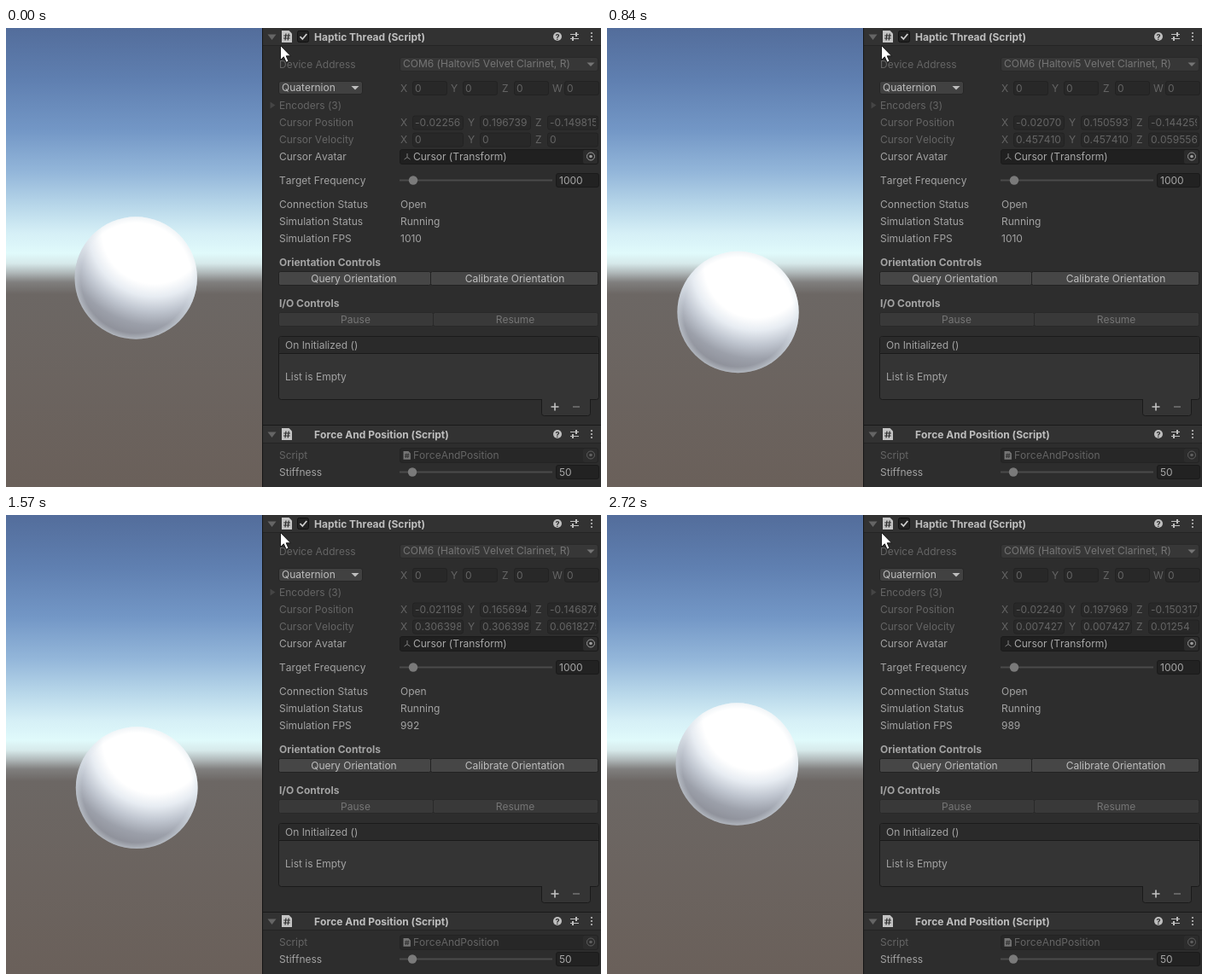
These frames come from a looping animation (697x538 px, 2790 ms). An HTML page:

```html
<!DOCTYPE html>
<html lang="en">
<head>
<meta charset="utf-8">
<title>Haptic inspector</title>
<style>
html, body { margin: 0; width: 100%; height: 100%; overflow: hidden; background: #2d2d2d; }
svg { display: block; width: 697px; height: 538px; }
text {
  font: 12px Inter, "Liberation Sans", sans-serif;
  font-kerning: none;
  font-variant-ligatures: none;
  white-space: pre;
}
.b { font-weight: 700; }
</style>
</head>
<body>
<svg id="stage" viewBox="0 0 697 538" xmlns="http://www.w3.org/2000/svg">
  <defs>
    <linearGradient id="sky" gradientUnits="userSpaceOnUse" x1="0" y1="0" x2="0" y2="538"></linearGradient>
    <radialGradient id="shade" cx=".65" cy=".12" r=".97">
      <stop offset=".44" stop-color="#fff"/>
      <stop offset=".55" stop-color="#e7ecf2"/>
      <stop offset=".67" stop-color="#c0c6d0"/>
      <stop offset=".79" stop-color="#9ca0aa"/>
      <stop offset=".92" stop-color="#8b8d96"/>
      <stop offset="1" stop-color="#8b8c92"/>
    </radialGradient>
    <radialGradient id="rim">
      <stop offset=".9" stop-color="#dfe8ee" stop-opacity="0"/>
      <stop offset="1" stop-color="#dfe8ee" stop-opacity=".45"/>
    </radialGradient>
    <clipPath id="cells"></clipPath>
  </defs>
  <rect width="300" height="538" fill="url(#sky)"/>
  <g id="ball">
    <circle r="1" fill="url(#shade)"/>
    <circle r="1" fill="url(#rim)"/>
  </g>
  <g id="panel"></g>
  <path d="M321.5 20.5V37.5L325.3 33.8L328.2 40.2L331 39L328.2 32.8H333.4Z" fill="#fff" stroke="#111" stroke-width=".9"/>
</svg>
<script>
const NS = 'http://www.w3.org/2000/svg';
const $ = id => document.getElementById(id);
const panel = $('panel');
const LABEL = '#a3a3a3', DIM = '#656565', BRIGHT = '#bebebe', BG = '#2d2d2d', LINE = '#1a1a1a';

function add(tag, attrs, parent = panel) {
  const el = document.createElementNS(NS, tag);
  for (const k in attrs) el.setAttribute(k, attrs[k]);
  parent.appendChild(el);
  return el;
}
const rect = (x, y, w, h, fill, rx = 0, stroke = 'none') =>
  add('rect', { x, y, width: w, height: h, fill, rx, stroke });
const path = (d, fill, stroke = 'none', width = 1) =>
  add('path', { d, fill, stroke, 'stroke-width': width });
const dot = (cx, cy, r, fill, stroke = 'none') => add('circle', { cx, cy, r, fill, stroke });

function text(x, mid, str, fill = LABEL, cls = '', anchor = 'start') {
  const el = add('text', { x, y: mid + 4, fill, class: cls, 'text-anchor': anchor });
  el.textContent = str;
  return el;
}

const field = (x, y, w, dim) =>
  rect(x + .5, y + .5, w - 1, 16, dim ? '#282828' : '#222', 2.5, dim ? '#222' : LINE);
const arrow = (x, y, fill) => path(`M${x - 4.5} ${y - 2}h9l-4.5 4.5z`, fill);

function scriptIcon(x, y, s, fill) {
  path(`M${x} ${y}h${8.5 * s}l${3.5 * s} ${3.5 * s}v${10.5 * s}h${-12 * s}z`, fill);
  const c = k => x + k * s, r = k => y + k * s;
  path(`M${c(5)} ${r(3.5)}L${c(4)} ${r(11.5)}M${c(8.2)} ${r(3.5)}L${c(7.2)} ${r(11.5)}` +
    `M${c(2.2)} ${r(6)}H${c(10)}M${c(2)} ${r(9)}H${c(9.7)}`, 'none', BG, 1.2 * s);
}

function header(top, title) {
  const mid = top + 10.5;
  rect(301, top, 396, 20, '#323232');
  rect(301, top + 20, 396, 1, '#242424');
  path(`M306.5 ${mid - 3}h10l-5 6.5z`, '#656565');
  scriptIcon(323, top + 3, 1, '#c4c4c4');
  text(361, top + 11, title, BRIGHT, 'b');
  dot(646, mid - .5, 5, BRIGHT);
  text(646, mid - 1, '?', BG, 'b', 'middle').style.fontSize = '9px';
  path(`M661 ${mid - 3}h10M661 ${mid + 2}h10`, 'none', BRIGHT, 1.2);
  path(`M668 ${mid - 5.5}v5M664 ${mid - .5}v5`, 'none', BRIGHT, 2);
  for (const d of [-4.5, -.5, 3.5]) dot(686, mid + d, 1.1, BRIGHT);
}

function slider(mid, knob, value) {
  rect(461, mid - 1.5, 179, 2, '#4b4b4b');
  dot(knob, mid - .5, 5.2, '#7a7a7a');
  field(644, mid - 9, 51);
  text(648, mid, value, '#a8a8a8');
}

function objectField(mid, str, dim) {
  rect(461.5, mid - 8.5, 232, 17, dim ? '#272727' : '#202020', 2.5, dim ? '#232323' : LINE);
  rect(676, mid - 8, 17, 16, '#2c2c2c', 2);
  const c = dim ? '#606060' : '#9d9d9d';
  dot(685, mid - .5, 4.5, 'none', c);
  dot(685, mid - .5, 1.8, c);
  text(477, mid, str, dim ? DIM : '#a8a8a8');
}

function button(x, y, w, mid, str, dim) {
  rect(x + .5, y + .5, w - 1, 16, dim ? '#393939' : '#464646', 2, dim ? '#292929' : '#222');
  text(mid, y + 9, str, dim ? '#757575' : BRIGHT, '', 'middle');
}

// Sky and ground
[[0, '#536d9b'], [60, '#5f7fb0'], [120, '#7397c6'], [170, '#94b7da'], [210, '#b9d8ea'],
 [240, '#d5eff6'], [264, '#e0fafb'], [276, '#d6e9ea'], [287, '#b0b8b9'], [298, '#807f7e'],
 [312, '#6c6764'], [538, '#6a605a']]
  .forEach(([y, c]) => add('stop', { offset: y / 538, 'stop-color': c }, $('sky')));

// Inspector
rect(300, 0, 1, 538, '#151515');
rect(301, 0, 396, 538, BG);
header(0, 'Haptic Thread (Script)');
rect(341.5, 3.5, 13, 13, '#222', 2, '#111');
path('M344.5 10l2.8 3l5-6', 'none', '#d0d0d0', 1.8);

text(320, 43, 'Device Address', DIM);
rect(461.5, 34.5, 232, 16, '#373737', 2.5, '#292929');
text(465, 42, 'COM6 (Haltovi5 Velvet Clarinet, R)', '#757575');
arrow(685, 42.5, '#757575');

rect(319.5, 62.5, 98, 15, '#414141', 2.5, '#262626');
text(323, 70, 'Quaternion', BRIGHT);
arrow(409, 70, BRIGHT);
['X', 'Y', 'Z', 'W'].forEach((name, i) => {
  const x = 476 + Math.round(i * 59.4);
  text(x - 14, 71, name, DIM);
  field(x, 62, 41, true);
  text(x + 3, 71, '0', DIM);
});

path('M309.5 86.5v8l6-4z', '#454545');
text(320, 91, 'Encoders (3)', DIM);

const cells = [];
['Cursor Position', 'Cursor Velocity'].forEach((label, row) => {
  const mid = 111 + row * 20;
  text(320, mid, label, DIM);
  ['X', 'Y', 'Z'].forEach((name, i) => {
    const x = 476 + i * 79;
    text(x - 14, mid, name, DIM);
    field(x, mid - 8.5, 60, true);
    add('rect', { x: x + 2, y: mid - 8, width: 55, height: 16 }, $('cells'));
    const cell = text(x + 3, mid, '0', DIM);
    cell.setAttribute('clip-path', 'url(#cells)');
    cells.push(cell);
  });
});

text(320, 151, 'Cursor Avatar');
objectField(151, 'Cursor (Transform)');
path('M470 147v4.5l-3.5 2.5M470 151.5l3.5 2.5', 'none', '#808080', 1);
text(320, 179, 'Target Frequency');
slider(179, 477, '1000');

text(320, 207, 'Connection Status');
text(462, 207, 'Open');
text(320, 227, 'Simulation Status');
text(462, 227, 'Running');
text(320, 247, 'Simulation FPS');
const fps = text(462, 247, '1010');

text(320, 275, 'Orientation Controls', LABEL, 'b');
button(319, 285, 179, 407.5, 'Query Orientation');
button(497, 285, 197, 596, 'Calibrate Orientation');
text(320, 323, 'I/O Controls', LABEL, 'b');
button(319, 333, 182, 409.5, 'Pause', true);
button(500, 333, 194, 596.5, 'Resume', true);

rect(627.5, 430.5, 57, 24, '#343434', 3, LINE);
rect(319.5, 361.5, 375, 74, '#343434', 3, LINE);
rect(320, 362, 374, 19, '#2a2a2a', 2);
rect(320, 381, 374, 1, LINE);
rect(628, 435, 56, 1.5, '#343434');
text(327, 372, 'On Initialized ()');
text(327, 409, 'List is Empty');
path('M638.5 444h9M643 439.5v9', 'none', '#c4c4c4', 1.6);
path('M664 444h8', 'none', '#757575', 1.5);

rect(301, 465, 396, 1, LINE);
header(466, 'Force And Position (Script)');
text(320, 501, 'Script', DIM);
objectField(501, 'ForceAndPosition', true);
scriptIcon(465.5, 496, .7, '#757575');
text(320, 521, 'Stiffness');
slider(521, 476, '50');

// Turning points of the ball: step, height
const BOUNCE = [[0, 293], [6, 315.5], [8.5, 302.5], [11, 333], [17, 243.5],
  [22.2, 320], [28.1, 286.5], [31, 293], [39, 292]];
// Readouts: step, position x y z, velocity xy, velocity z
const READ = [
  [0, -.02256, .196739, -.149815, 0, 0],
  [7, -.02208, .172910, -.148667, -.09926, -.00041],
  [15, -.01933, .222083, -.139852, 1.014081, .1195238],
  [19, -.019816, .224459, -.14220, .625167, .059277],
  [25, -.02258, .177108, -.151553, -.01237, .064378],
  [31, -.02209, .196563, -.150149, 0, 0],
  [39, -.022405, .197969, -.150317, .007427, .012540]
];
const LOOP = 2790, STEP = 66.8, PX = 950;

const linear = u => u;
const swing = u => (1 - Math.cos(Math.PI * u)) / 2;

function between(keys, n, value, ease) {
  const i = Math.max(1, keys.findIndex(k => k[0] >= n));
  const a = keys[i - 1], b = keys[i];
  return value(a) + (value(b) - value(a)) * ease((n - a[0]) / (b[0] - a[0]));
}
const height = n => between(BOUNCE, n, k => k[1], swing);
const read = (n, value) => between(READ, n, value, linear);
const show = v => String(+v.toPrecision(7));

// The picture moves in even steps, with one long rest at step 31
function stepAt(t) {
  const n = Math.max(0, Math.floor((t - 165) / STEP) + 1);
  return n === 32 ? 31 : Math.min(n, 39);
}

function draw(now) {
  const n = stepAt(now % LOOP), y = height(n);
  const [px, pz, vel, vz] = [1, 3, 4, 5].map(c => read(n, k => k[c]));
  const py = read(n, k => k[2] + height(k[0]) / PX) - y / PX;
  const x = 152.2 + (px + .02256) * 720, r = 71.6 - (pz + .149) * 100;
  $('ball').setAttribute('transform', `translate(${x} ${y}) scale(${r})`);
  [px, py, pz, vel, vel, vz].forEach((v, i) => { cells[i].textContent = show(v); });
  fps.textContent = n < 21 ? '1010' : n < 36 ? '992' : '989';
}

const begin = performance.now();
function loop() {
  draw(performance.now() - begin);
  requestAnimationFrame(loop);
}
draw(0);
requestAnimationFrame(loop);
</script>
</body>
</html>
```
